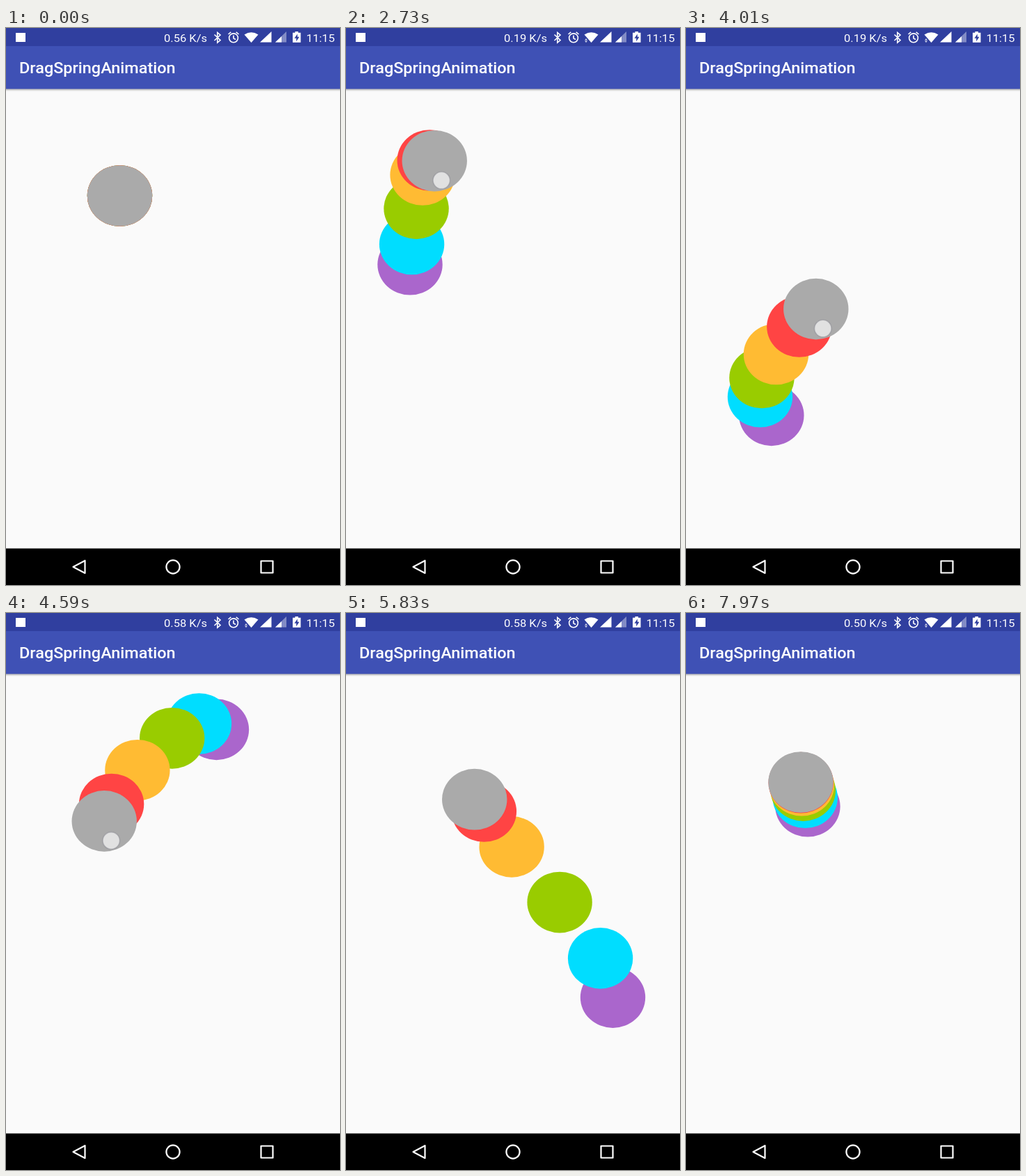
An HTML page that plays this animation: 480x800 px, repeating every 7.99 s.

```html
<!DOCTYPE html>
<html lang="en">
<head>
<meta charset="utf-8">
<title>DragSpringAnimation</title>
<style>
  html, body { margin: 0; width: 100%; height: 100%; overflow: hidden; background: #fafafa; }
  svg { display: block; width: 100%; height: 100%; }
  text { font-family: Roboto, sans-serif; fill: #fff; }
  .status { font-size: 15.5px; }
  .title { font-size: 22px; font-weight: 500; }
  .line { fill: none; stroke: #fff; stroke-width: 1.6; }
  .nav { fill: none; stroke: #fff; stroke-width: 2.2; stroke-linejoin: round; }
  .white { fill: #fff; }
</style>
</head>
<body>
<svg viewBox="0 0 480 800">
  <defs>
    <linearGradient id="shade" x2="0" y2="1">
      <stop stop-color="#000" stop-opacity=".32"/>
      <stop offset="1" stop-color="#000" stop-opacity="0"/>
    </linearGradient>
  </defs>
  <rect width="480" height="800" fill="#fafafa"/>
  <rect y="87" width="480" height="4" fill="url(#shade)"/>
  <rect width="480" height="87.5" fill="#3f51b5"/>
  <rect width="480" height="26" fill="#303f9f"/>

  <g id="chain"></g>
  <circle id="touch" r="12.3" fill="#fff" fill-opacity=".65" stroke="#8e8e96" stroke-opacity=".55" stroke-width="1.6"/>

  <rect class="white" x="14" y="7" width="14" height="13"/>
  <path class="line" d="M299.5 9.5 308 17.5 303.8 21V6.5L308 10 299.5 18"/>
  <circle class="line" cx="327" cy="14.3" r="6.4"/>
  <path class="line" d="M327 10.5V14.7L330 16.5M319.5 9 323.3 5.8M334.5 9 330.7 5.8"/>
  <path class="white" d="M342.5 9.5Q352.5 3 362.5 9.5L352.5 21Z"/>
  <path id="data" class="white" d="M343 17.5h4l-2 -2.5zM343 18.5h4l-2 2.5z" opacity=".8"/>
  <path class="white" d="M365 20.5 381.5 5V20.5Z"/>
  <path class="white" d="M387 20.5 403 5V20.5Z" opacity=".4"/>
  <path class="white" d="M387 20.5 396 12V20.5Z"/>
  <path class="white" d="M415.5 5h4.5v1.8h3.5v14h-11.5v-14h3.5z"/>
  <path fill="#303f9f" d="M418.8 8.5 414.5 14.8h2.7v4.5l4.3 -6.5h-2.7z"/>

  <!-- the phone screen is shown slightly wide -->
  <g transform="scale(1.0667 1)">
    <text class="status" id="speed" x="212.8" y="19.7"></text>
    <text class="status" x="404.5" y="19.7">11:15</text>
    <text class="title" x="17.8" y="65.5">DragSpringAnimation</text>
  </g>

  <rect y="747.5" width="480" height="52.5"/>
  <path class="nav" d="M96.5 774 113.5 765V783Z"/>
  <circle class="nav" cx="240" cy="774" r="9.6"/>
  <rect class="nav" x="366.5" y="765.5" width="17" height="17"/>
</svg>
<script>
const LOOP = 7990;
const HOME = [163.5, 241];
const COLORS = ['#aaa', '#f44', '#fb3', '#9c0', '#0df', '#a6c'];

// Key points of the leader's route: time, x, y.
const ROUTE = [
  [1730, ...HOME], [2020, 170, 390], [2500, 92, 340], [2700, 120, 190],
  [3080, 265, 290], [3160, 294, 415], [3390, 303, 624], [3500, 295, 655],
  [3850, 105, 520], [4250, 335, 220], [4410, 278, 159], [4570, 148, 282],
  [4780, 105, 450], [5150, 270, 630], [5470, 407, 645], [5650, 366, 497],
  [5750, 239, 337], [5830, 185, 268], [5960, ...HOME],
  [6130, ...HOME], [6450, 160, 200], [6620, 146, 291], [6720, 110, 462],
  [6850, 122, 576], [7220, 390, 650], [7460, 330, 620], [7740, 175, 278], [7970, 165, 243]
];
const FINGER = [10, 28];
const HOLDS = [[1590, 5500], [6130, 7460]];
const SPEEDS = ['0.56', '0.19', '0.58', '0.50'];

// Each ball repeats the leader's route a little later.
const lag = i => Math.max(0, 50 * i - 20);
const slope = (a, b, axis) => (b[axis] - a[axis]) / (b[0] - a[0]);

// Tangent that never overshoots its neighbours.
function tangent(i, axis) {
  if (i < 1 || i > ROUTE.length - 2) return 0;
  const a = slope(ROUTE[i - 1], ROUTE[i], axis);
  const b = slope(ROUTE[i], ROUTE[i + 1], axis);
  return a * b > 0 ? 2 * a * b / (a + b) : 0;
}

function leader(t) {
  const n = ROUTE.findIndex(key => key[0] > t);
  if (n === 0) return HOME;
  if (n < 0) return ROUTE[ROUTE.length - 1].slice(1);
  const a = ROUTE[n - 1], b = ROUTE[n], h = b[0] - a[0], u = (t - a[0]) / h;
  const s = u * u * (3 - 2 * u);
  return [1, 2].map(axis =>
    a[axis] + (b[axis] - a[axis]) * s +
    h * u * (1 - u) * ((1 - u) * tangent(n - 1, axis) - u * tangent(n, axis)));
}

const el = id => document.getElementById(id);
const chain = el('chain'), touch = el('touch'), speed = el('speed'), data = el('data');

const balls = COLORS.map(color => {
  const ball = document.createElementNS('http://www.w3.org/2000/svg', 'ellipse');
  ball.setAttribute('rx', 46.7);
  ball.setAttribute('ry', 43.8);
  ball.setAttribute('fill', color);
  chain.prepend(ball);
  return ball;
});

function place(node, [x, y]) {
  node.setAttribute('cx', x.toFixed(2));
  node.setAttribute('cy', y.toFixed(2));
}

function draw(t) {
  balls.forEach((ball, i) => place(ball, leader(t - lag(i))));
  place(touch, leader(t).map((v, axis) => v + FINGER[axis]));
  const held = HOLDS.some(([from, to]) => t >= from && t < to);
  touch.style.display = held ? '' : 'none';
  // The network speed refreshes every three seconds.
  speed.textContent = SPEEDS[Math.floor((t + 1610) / 3000)] + ' K/s';
  data.style.display = t >= 2400 ? '' : 'none';
}

const start = performance.now();
function tick() {
  draw((performance.now() - start) % LOOP);
  requestAnimationFrame(tick);
}
tick();
</script>
</body>
</html>
```
